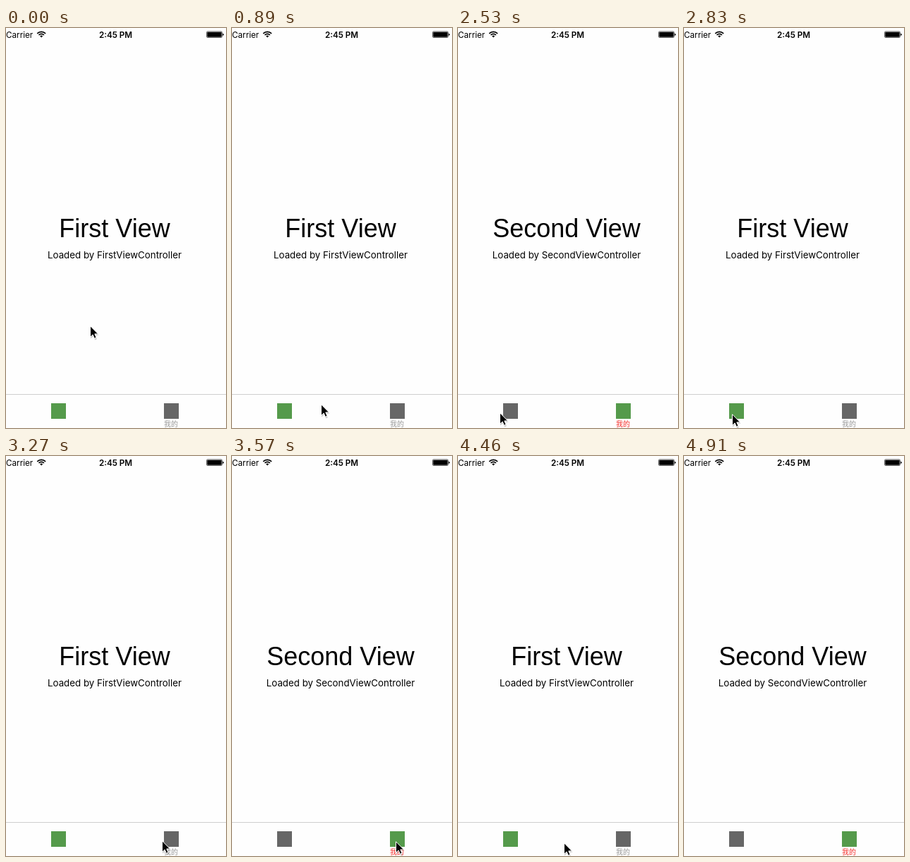
These frames come from a looping animation (312 by 566 pixels, 5360 ms). An HTML page:

```html
<!DOCTYPE html>
<html lang="zh">
<head>
<meta charset="utf-8">
<title>Tab bar</title>
<style>
  html, body { margin: 0; width: 100%; height: 100%; overflow: hidden; background: #fefefe; }
  svg { display: block; width: 312px; height: 566px; font-family: Inter, sans-serif; }
  .mid { text-anchor: middle; }
  .title { font: 36px "Liberation Sans", Arial, sans-serif; }
  .sub { font-size: 13.3px; }
  .status { font-size: 11.7px; }
  .label { font: 10px "Noto Sans CJK SC", "Noto Sans CJK", sans-serif; }

  .first, .second, .home, .mine, .label, .cursor { animation: 5.36s step-end infinite; }
  .first { animation-name: first; }
  .second { animation-name: second; }
  .home { animation-name: home; }
  .mine { animation-name: mine; }
  .label { animation-name: label; }
  .cursor { animation-name: cursor; }

  @keyframes first {
    0%, 49.99%, 74.81% { opacity: 1; }
    36%, 63.8%, 88.8%, 100% { opacity: 0; }
  }
  @keyframes second {
    0%, 49.99%, 74.81% { opacity: 0; }
    36%, 63.8%, 88.8%, 100% { opacity: 1; }
  }
  @keyframes label {
    0%, 49.99%, 74.81% { fill: #999; }
    36%, 63.8%, 88.8%, 100% { fill: #f5302c; }
  }
  @keyframes home {
    0%, 24.99%, 52.61%, 77.61% { fill: #559a4b; }
    22.2%, 49.99%, 74.81% { fill: #333; }
    36%, 63.8%, 88.8%, 100% { fill: #666; }
  }
  @keyframes mine {
    0%, 49.99%, 74.81% { fill: #666; }
    36%, 63.8%, 88.8% { fill: #333; }
    38.8%, 66.6%, 91.6%, 100% { fill: #559a4b; }
  }
  @keyframes cursor {
    0% { transform: translate(119px, 421px); }
    5.59% { transform: translate(144px, 474px); }
    8.39% { transform: translate(192px, 528px); }
    11.19% { transform: translate(203px, 533px); }
    16.6% { transform: translate(126px, 532px); }
    19.4% { transform: translate(86px, 532px); }
    22.2% { transform: translate(76px, 538px); }
    27.79% { transform: translate(110px, 536px); }
    30.59% { transform: translate(182px, 536px); }
    33.39% { transform: translate(230px, 540px); }
    38.8% { transform: translate(232px, 544px); }
    41.6% { transform: translate(195px, 545px); }
    44.4% { transform: translate(112px, 544px); }
    47.2% { transform: translate(59px, 544px); }
    49.99% { transform: translate(68px, 546px); }
    55.4% { transform: translate(85px, 547px); }
    58.2% { transform: translate(150px, 546px); }
    61% { transform: translate(221px, 544px); }
    63.8% { transform: translate(232px, 545px); }
    69.4% { transform: translate(180px, 546px); }
    72.01% { transform: translate(105px, 547px); }
    74.81% { transform: translate(79px, 548px); }
    80.4% { transform: translate(98px, 547px); }
    83.2% { transform: translate(150px, 547px); }
    86% { transform: translate(215px, 545px); }
    88.8% { transform: translate(230px, 543px); }
    91.6%, 100% { transform: translate(-40px, -40px); }
  }
</style>
</head>
<body>
<svg viewBox="0 0 312 566">
  <g class="status">
    <text x="0" y="13.5">Carrier</text>
    <text class="mid" x="155.5" y="13.5" font-weight="600">2:45 PM</text>
  </g>

  <!-- Wi-Fi -->
  <g fill="none" stroke="#000" stroke-width="1.7">
    <path d="M44.3 7.8a8.3 8.3 0 0 1 11.8 0M46.5 10a5.2 5.2 0 0 1 7.4 0"/>
    <path d="M50.2 13.6l-2-2.1a2.8 2.8 0 0 1 4 0z" fill="#000" stroke="none"/>
  </g>

  <!-- Battery -->
  <rect x="284.5" y="4.9" width="22" height="8.6" rx="1.4" fill="none" stroke="#000" stroke-width=".6"/>
  <rect x="285.3" y="5.7" width="20.4" height="7" rx=".7"/>
  <path d="M307.3 7.4q1.6 .5 1.6 1.8t-1.6 1.8z"/>

  <g class="mid">
    <g class="first">
      <text class="title" x="154" y="296">First View</text>
      <text class="sub" x="154" y="325.5">Loaded by FirstViewController</text>
    </g>
    <g class="second">
      <text class="title" x="154" y="296">Second View</text>
      <text class="sub" x="154" y="325.5">Loaded by SecondViewController</text>
    </g>
  </g>

  <!-- Tab bar -->
  <rect y="518" width="312" height="1" fill="#cfcfcf"/>
  <rect class="home" x="64" y="531" width="21" height="22"/>
  <rect class="mine" x="224" y="531" width="21" height="22"/>
  <text class="label mid" x="234" y="563.5">我的</text>

  <g class="cursor">
    <path d="M1 2v16.5l3.8-3.6 2.4 5.5 2.8-1.2-2.4-5.4h5z" fill="#000" opacity=".18"/>
    <path d="M.5 .7v15.6l3.6-3.4 2.3 5.3 2.7-1.1-2.3-5.2h4.8z" stroke="#fff" stroke-width="1"/>
  </g>
</svg>
</body>
</html>
```
